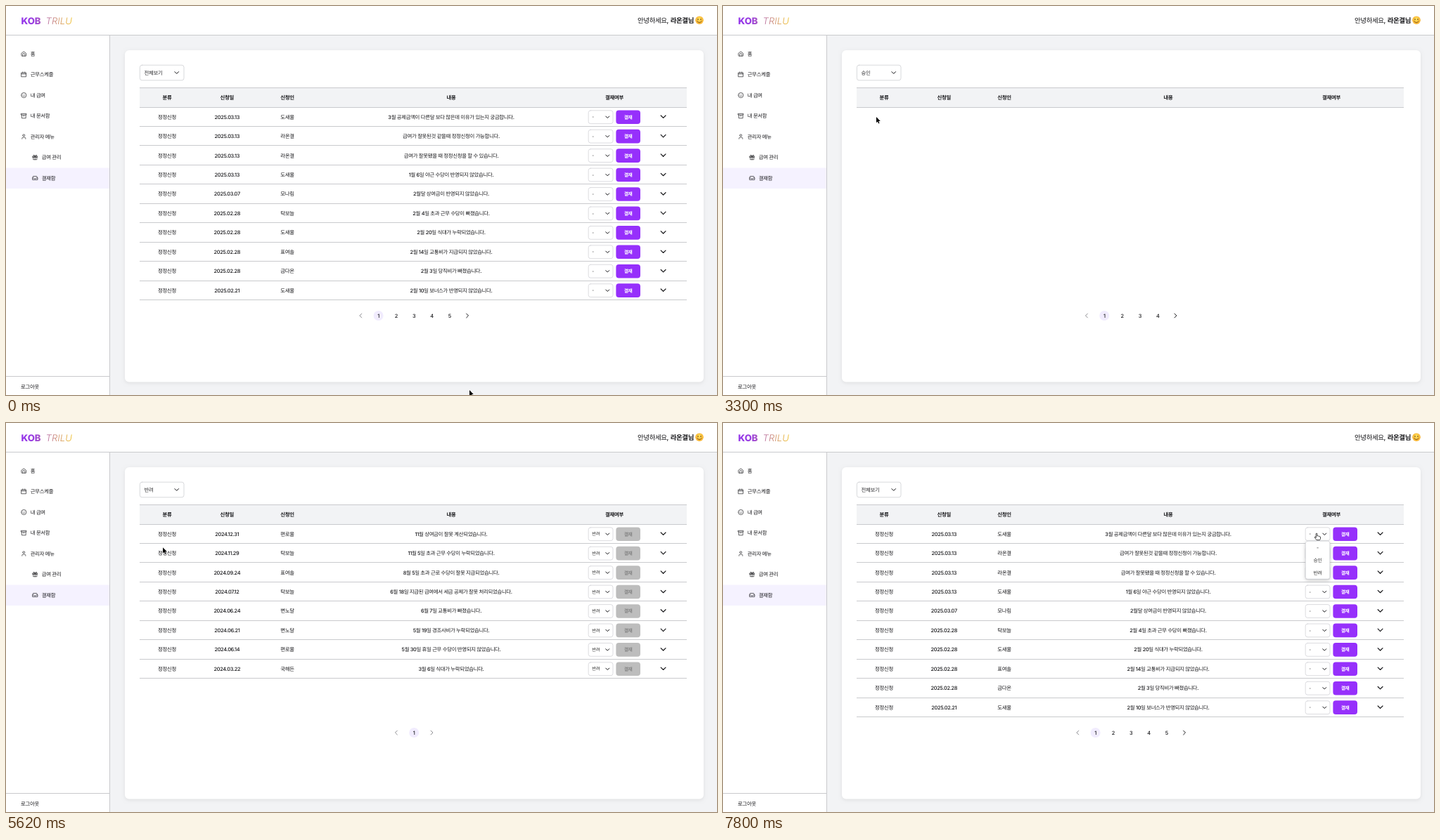
Write an HTML page with a canvas that moves like this. It is 1011 px wide and 554 px high and loops after 8 s.

```html
<!DOCTYPE html>
<html lang="ko">
<head>
<meta charset="utf-8">
<title>결재함</title>
<style>
html, body { margin: 0; width: 100%; height: 100%; overflow: hidden; background: #f2f3f5; }
canvas { display: block; width: 1011px; height: 554px; }
</style>
</head>
<body>
<canvas id="stage"></canvas>
<script>
const W = 1011, H = 554, LOOP = 8000;
const canvas = document.getElementById('stage');
const ctx = canvas.getContext('2d');
const dpr = window.devicePixelRatio || 1;
canvas.width = W * dpr;
canvas.height = H * dpr;

const FONT = 'Inter, "Noto Sans CJK KR", "Noto Sans CJK", sans-serif';
const INK = '#17171a', LINE = '#c9cacd', PURPLE = '#9630fb';
const ROW0 = 158, PITCH = 27.44;
const OPTIONS = ['전체보기', '결재 전', '승인', '반려'];

const PENDING = [
  '2025.03.13|도새울|3월 공제금액이 다른달 보다 많은데 이유가 있는지 궁금합니다.',
  '2025.03.13|라온결|급여가 잘못된것 같을때 정정신청이 가능합니다.',
  '2025.03.13|라온결|급여가 잘못됐을 때 정정신청을 할 수 있습니다.',
  '2025.03.13|도새울|1월 6일 야근 수당이 반영되지 않았습니다.',
  '2025.03.07|모나림|2월달 상여금이 반영되지 않았습니다.',
  '2025.02.28|탁보늘|2월 4일 초과 근무 수당이 빠졌습니다.',
  '2025.02.28|도새울|2월 20일 식대가 누락되었습니다.',
  '2025.02.28|표여솔|2월 14일 교통비가 지급되지 않았습니다.',
  '2025.02.28|금다온|2월 3일 당직비가 빠졌습니다.',
  '2025.02.21|도새울|2월 10일 보너스가 반영되지 않았습니다.'
];
const APPROVED = [
  '2025.02.14|봉이랑|1월 8일 당직비가 누락되었습니다.',
  '2025.01.28|국해든|1월 9일 출장비가 누락되었습니다.',
  '2025.01.13|금다온|12월 15일 휴일 근무 수당이 잘못 반영되었습니다.',
  '2024.12.31|도새울|12월 연말 상여금이 누락되었습니다.',
  '2024.12.27|금다온|12월 8일 출장비가 지급되지 않았습니다.',
  '2024.12.20|모나림|11월 28일 교통비가 잘못 지급되었습니다.',
  '2024.12.16|편로울|11월 6일 추가 수당이 지급되지 않았습니다.',
  '2024.11.08|도새울|10월 23일 상여금이 빠졌습니다.',
  '2024.10.25|도새울|10월 21일 식대가 반영되지 않았습니다.',
  '2024.10.25|금다온|9월 3일 휴일 근무 수당이 빠졌습니다.'
];
const REJECTED = [
  '2024.12.31|편로울|11월 상여금이 잘못 계산되었습니다.',
  '2024.11.29|탁보늘|11월 5일 초과 근무 수당이 누락되었습니다.',
  '2024.09.24|표여솔|8월 5일 초과 근로 수당이 잘못 지급되었습니다.',
  '2024.07.12|탁보늘|6월 18일 지급된 급여에서 세금 공제가 잘못 처리되었습니다.',
  '2024.06.24|변노달|6월 7일 교통비가 빠졌습니다.',
  '2024.06.21|변노달|5월 19일 경조사비가 누락되었습니다.',
  '2024.06.14|편로울|5월 30일 휴일 근무 수당이 반영되지 않았습니다.',
  '2024.03.22|국해든|3월 6일 식대가 누락되었습니다.'
];

// Each view: start, time its rows appear, chosen option, page count, rows, decision
const VIEWS = [
  { at: 0, ready: 0, option: 0, pages: 5, rows: PENDING, mark: '-' },
  { at: 1740, ready: 1740, option: 1, pages: 2, rows: PENDING, mark: '-' },
  { at: 3180, ready: 3420, option: 2, pages: 4, rows: APPROVED, mark: '승인' },
  { at: 4940, ready: 5060, option: 3, pages: 1, rows: REJECTED, mark: '반려' },
  { at: 6380, ready: 6660, option: 0, pages: 5, rows: PENDING, mark: '-' }
];
const MENU_OPEN = [[680, 1740], [2560, 3180], [4140, 4940], [5980, 6380]];
const ROW_MENU_AT = 7800;

const easeInOut = p => p * p * (3 - 2 * p);
const easeOut = p => 1 - (1 - p) * (1 - p);
const MOVES = [
  [20, 500, 236, 96, easeInOut],
  [780, 1500, 226, 133.5, easeInOut],
  [2280, 2400, 227, 99, easeOut],
  [2600, 3000, 218, 158, easeInOut],
  [3740, 4020, 243, 89.5, easeInOut],
  [4320, 4480, 223, 178, easeInOut],
  [5610, 5800, 231, 101, easeInOut],
  [6150, 6200, 230, 112.5, easeOut],
  [6970, 7500, 872, 181, easeInOut],
  [7500, 7760, 844, 157, easeInOut]
];

const ICONS = {
  home: 'M3 10l9-7 9 7v10a1 1 0 0 1-1 1H4a1 1 0 0 1-1-1zM8 21v-7a4 4 0 0 1 8 0v7',
  calendar: 'M3 5h18v16H3zM3 10h18M8 2v4M16 2v4',
  smile: 'M2 12a10 10 0 1 0 20 0a10 10 0 1 0-20 0M8 14s1.5 2 4 2 4-2 4-2M9 9h.01M15 9h.01',
  archive: 'M2 3h20v5H2zM4 8v13h16V8M10 12h4',
  user: 'M8 7a4 4 0 1 0 8 0a4 4 0 1 0-8 0M5 21v-2a4 4 0 0 1 4-4h6a4 4 0 0 1 4 4v2',
  gift: 'M3 8h18v4H3zM5 12v9h14v-9M12 8v13M12 8H7.5a2.5 2.5 0 1 1 0-5C11 3 12 8 12 8s1-5 4.5-5a2.5 2.5 0 1 1 0 5H12',
  inbox: 'M22 12h-6l-2 3h-4l-2-3H2M5.5 5h13L22 12v7H2v-7z'
};
const NAV = [
  ['home', '홈'], ['calendar', '근무스케줄'], ['smile', '내 급여'], ['archive', '내 문서함'],
  ['user', '관리자 메뉴'], ['gift', '급여 관리', 16], ['inbox', '결재함', 16]
];
const ARROW = new Path2D('M0 0v8.2l1.9-1.8 1.3 3 1.3-.6-1.3-2.9h2.6z');
const HAND = new Path2D('M-.9 1a.9 .9 0 0 1 1.8 0v2.8q1.4-.6 1.7.4q1.3-.5 1.6.5q1.3-.2 1.3.9v1.9q0 1-1 2.2H.2q-1.6-1.8-2.8-3.6q-.3-1 .6-1.1l1.1.9z');

function text(str, x, y, { size = 7.4, weight = 500, color = INK, align = 'left', gap = -0.045, style = '' } = {}) {
  ctx.font = `${style} ${weight} ${size}px ${FONT}`;
  ctx.letterSpacing = (gap * size).toFixed(3) + 'px';
  ctx.textRendering = 'geometricPrecision';
  ctx.textAlign = align;
  ctx.fillStyle = color;
  ctx.fillText(str, x, y + size * 0.364);
}

const center = (str, x, y, opts) => text(str, x, y, { align: 'center', ...opts });

function rect(x, y, w, h, color) {
  ctx.fillStyle = color;
  ctx.fillRect(x, y, w, h);
}

function box(x, y, w, h, r, fill, border, shadow) {
  ctx.save();
  ctx.beginPath();
  ctx.roundRect(x, y, w, h, r);
  if (shadow) {
    ctx.shadowColor = shadow;
    ctx.shadowBlur = 5 * dpr;
    ctx.shadowOffsetY = 1.5 * dpr;
  }
  ctx.fillStyle = fill;
  ctx.fill();
  ctx.restore();
  if (border) {
    ctx.strokeStyle = border;
    ctx.lineWidth = 0.8;
    ctx.stroke();
  }
}

// Chevron with half-length a, turned by quarter turns (0 points down)
function chevron(x, y, a, turns = 0, color = INK, width = 1) {
  ctx.save();
  ctx.translate(x, y);
  ctx.rotate(turns * Math.PI / 2);
  ctx.beginPath();
  ctx.moveTo(-a, -a / 2);
  ctx.lineTo(0, a / 2);
  ctx.lineTo(a, -a / 2);
  ctx.strokeStyle = color;
  ctx.lineWidth = width;
  ctx.stroke();
  ctx.restore();
}

function icon(name, x, y) {
  ctx.save();
  ctx.translate(x - 4.3, y - 4.3);
  ctx.scale(0.36, 0.36);
  ctx.strokeStyle = '#27272a';
  ctx.lineWidth = 2;
  ctx.stroke(new Path2D(ICONS[name]));
  ctx.restore();
}

function drawFace(x, y) {
  const glow = ctx.createRadialGradient(x, y - 2, 1, x, y, 6);
  glow.addColorStop(0, '#ffe05c');
  glow.addColorStop(1, '#f7ae2b');
  ctx.fillStyle = glow;
  ctx.beginPath();
  ctx.arc(x, y, 5.8, 0, 7);
  ctx.fill();
  ctx.fillStyle = ctx.strokeStyle = '#6b3f12';
  for (const side of [-2, 2]) {
    ctx.beginPath();
    ctx.ellipse(x + side, y - 1.2, 0.7, 1, 0, 0, 7);
    ctx.fill();
  }
  ctx.lineWidth = 0.8;
  ctx.beginPath();
  ctx.arc(x, y + 0.2, 3.2, 0.35, Math.PI - 0.35);
  ctx.stroke();
}

function drawHeader() {
  rect(0, 0, W, 41, '#fff');
  rect(0, 41, W, 1, LINE);
  const fade = ctx.createLinearGradient(22, 0, 95, 0);
  fade.addColorStop(0, '#9333ea');
  fade.addColorStop(0.25, '#9a3fe0');
  fade.addColorStop(1, '#f0c020');
  text('KOB', 21.5, 20.7, { size: 13.2, weight: 800, color: fade, gap: 0 });
  text('TRILU', 56.5, 20.7, { size: 13.2, weight: 300, color: fade, gap: 0, style: 'italic' });
  text('안녕하세요,', 898, 20.4, { size: 9.5 });
  text('라온결님', 978, 20.4, { size: 9.5, weight: 700, align: 'right' });
  drawFace(986, 20.2);
}

function drawSidebar() {
  rect(0, 42, 147, H - 42, '#fff');
  rect(147, 42, 1, H - 42, LINE);
  rect(0, 230.5, 147, 29.5, '#f5f2ff');
  NAV.forEach(([name, label, indent = 0], i) => {
    const y = 68 + i * 29.5;
    icon(name, 25.3 + indent, y);
    text(label, 34.8 + indent, y);
  });
  rect(0, 527, 147, 1, LINE);
  text('로그아웃', 21, 542.3);
}

function drawRow(row, i, mark) {
  const y = ROW0 + i * PITCH;
  const [date, name, note] = row.split('|');
  center('정정신청', 229, y);
  center(date, 314.3, y);
  center(name, 400, y);
  center(note, 633, y);
  box(828.2, y - 9.2, 34.8, 18.8, 3, '#fff', '#d3d4d8');
  text(mark, 833.3, y, { size: 6.4, weight: 400, color: '#333' });
  chevron(855.3, y + 0.3, 2.5);
  const done = mark !== '-';
  box(867.4, y - 9.6, 34.6, 19.6, 4, done ? '#bdbdbd' : PURPLE);
  center('결재', 884.6, y + 0.2, { size: 6.8, weight: 600, color: done ? '#858585' : '#fff' });
  chevron(934.6, y - 0.3, 3.4, 0, INK, 1.2);
  rect(190, Math.round(y + 13), 778, 1, LINE);
}

function drawPager(count) {
  const gap = 25.3, y = 441, start = 580.2 - gap * (count + 1) / 2;
  chevron(start, y, 2.9, 1, '#8c8c90');
  box(start + gap - 7, y - 7, 14, 14, 7, '#f1ecfe');
  for (let p = 1; p <= count; p++) center(String(p), start + gap * p, y);
  chevron(start + gap * (count + 1), y, 2.9, -1, count > 1 ? INK : '#8c8c90');
}

function drawTopMenu(cursor) {
  box(190.4, 106.4, 63.2, 82, 3, '#fff', '#d9dade', 'rgba(0,0,0,.18)');
  OPTIONS.forEach((label, i) => {
    const y = 117.2 + i * 20.2;
    if (Math.abs(cursor.y - y) < 10.1) box(193, y - 9.6, 57, 19.2, 2, '#f3f4f6');
    center(label, 222, y);
  });
}

function drawRowMenu() {
  box(828.4, 168.2, 34.4, 54, 3, '#fff', '#d9dade', 'rgba(0,0,0,.25)');
  ['-', '승인', '반려'].forEach((label, i) =>
    center(label, 845.5, 177.3 + i * 17.9, { size: 6.9, color: '#333' }));
}

function drawCard(t, view, cursor, menuOpen) {
  box(169, 63, 823, 472.5, 6, '#fff', null, 'rgba(0,0,0,.08)');
  box(190.4, 84.2, 62.6, 21.6, 3, '#fff', '#cfd0d4');
  text(OPTIONS[view.option], 196.6, 95, { color: '#2b2b2e' });
  chevron(242.7, 95, 2.8);
  rect(190, 116, 778, 28, '#f2f3f5');
  rect(190, 116, 778, 1, LINE);
  rect(190, 144, 778, 1, LINE);
  const heads = [['분류', 229], ['신청일', 314.3], ['신청인', 400], ['내용', 633], ['결재여부', 865]];
  for (const [label, x] of heads) center(label, x, 130.6, { weight: 600 });
  if (t >= view.ready) view.rows.forEach((row, i) => drawRow(row, i, view.mark));
  drawPager(view.pages);
  if (menuOpen) drawTopMenu(cursor);
  if (t >= ROW_MENU_AT) drawRowMenu();
}

function cursorAt(t) {
  let x = 659, y = 547;
  for (const [from, to, tx, ty, ease] of MOVES) {
    if (t < from) break;
    const p = ease(Math.min(1, (t - from) / (to - from)));
    x += (tx - x) * p;
    y += (ty - y) * p;
  }
  return { x, y };
}

function clickable({ x, y }, menuOpen, rows) {
  if (x > 190 && x < 254 && y > 84 && y < (menuOpen ? 188 : 106)) return true;
  const i = Math.round((y - ROW0) / PITCH);
  const onRow = i >= 0 && i < rows && Math.abs(y - ROW0 - i * PITCH) < 9.6;
  return onRow && (x > 828 && x < 863 || x > 867 && x < 902);
}

function drawCursor(cursor, hand) {
  const shape = hand ? HAND : ARROW;
  ctx.save();
  ctx.translate(cursor.x, cursor.y);
  ctx.lineJoin = 'round';
  ctx.lineWidth = hand ? 0.8 : 1;
  ctx.strokeStyle = hand ? '#111' : '#fff';
  ctx.fillStyle = hand ? '#fff' : '#000';
  if (!hand) ctx.stroke(shape);
  ctx.fill(shape);
  if (hand) ctx.stroke(shape);
  ctx.restore();
}

function draw(t) {
  const view = VIEWS.filter(v => t >= v.at).pop();
  const menuOpen = MENU_OPEN.some(([from, to]) => t >= from && t < to);
  const cursor = cursorAt(t);
  ctx.setTransform(dpr, 0, 0, dpr, 0, 0);
  ctx.lineCap = ctx.lineJoin = 'round';
  rect(0, 0, W, H, '#f2f3f5');
  drawHeader();
  drawSidebar();
  drawCard(t, view, cursor, menuOpen);
  drawCursor(cursor, clickable(cursor, menuOpen, t >= view.ready ? view.rows.length : 0));
}

const begin = performance.now();
function tick() {
  draw((performance.now() - begin) % LOOP);
  requestAnimationFrame(tick);
}
tick();
</script>
</body>
</html>
```
